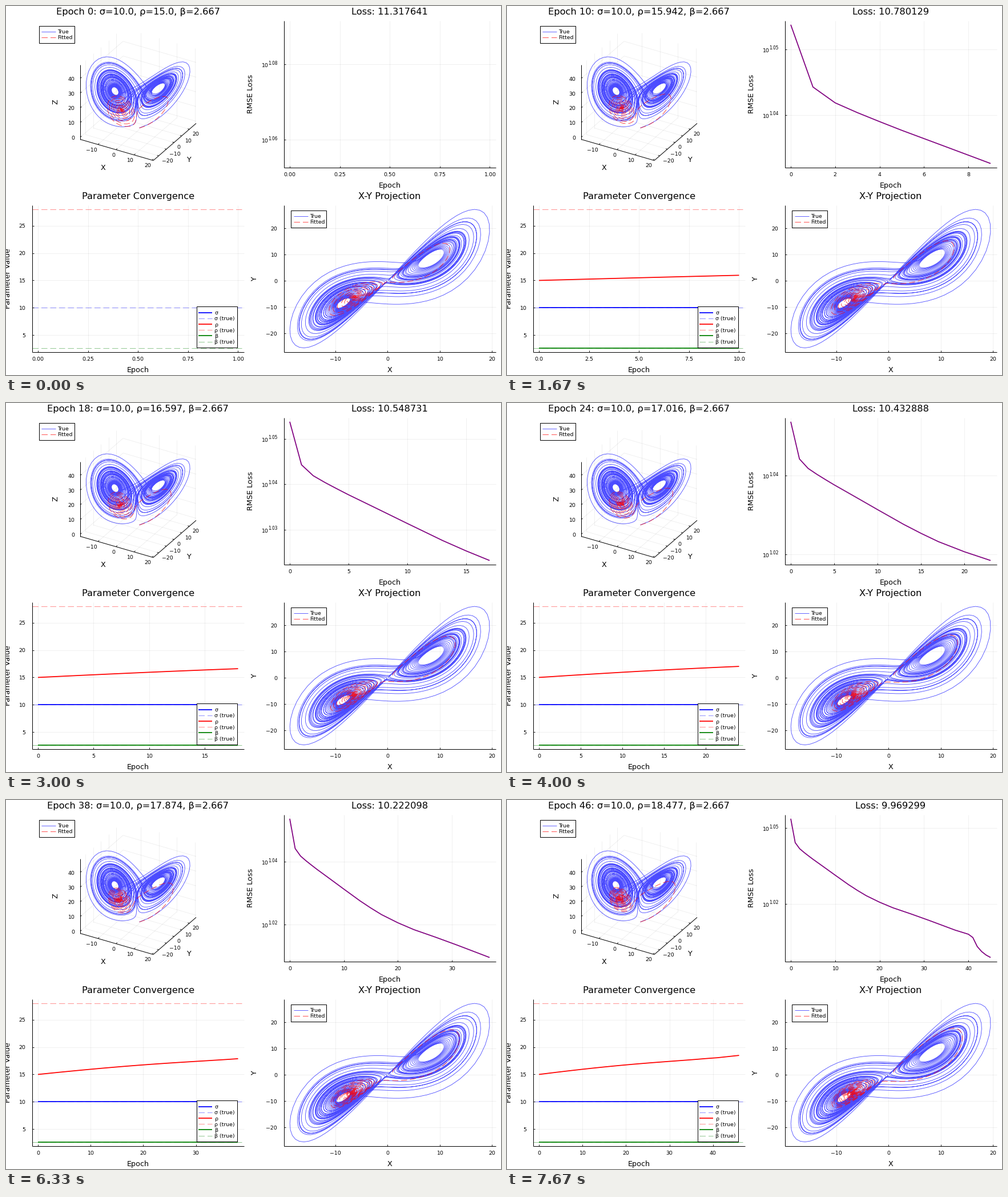
Write a matplotlib script that moves like this. It is 867 px wide and 646 px high and loops after 8 s.

```python
import math

import matplotlib.pyplot as plt
import numpy as np
from matplotlib.animation import FuncAnimation
from matplotlib.patches import Rectangle

W, H, DPI = 867, 646, 64
PT = 72 / DPI                      # points per pixel
FRAMES, LOOP_MS = 64, 8000
STAGES, EPOCH_STEP = 24, 2         # training snapshots per loop
SIGMA, RHO, BETA = 10.0, 28.0, 8 / 3
TITLE, GUIDE, TICK, SUPER = 16.3, 12.8, 9.35, 7.5
THIN, THICK = 0.85, 1.75
DASH = (10.5, 5)
TRUE_STYLE = dict(color="blue", alpha=0.7)
FIT_STYLE = dict(color="red", alpha=0.8, dashed=True)

plt.rcParams["font.family"] = "DejaVu Sans"
fig = plt.figure(figsize=(W / DPI, H / DPI), dpi=DPI, facecolor="white")
ax = fig.add_axes([0, 0, 1, 1])

# Training history: fitted rho per epoch and loss per step.
rho_knots = np.array([[0, 15], [6, 15.579], [14, 16.283], [24, 17.016],
                      [32, 17.501], [38, 17.874]])
rho_poly = np.polyfit(rho_knots[:, 0] / 38, rho_knots[:, 1], 5)
loss_knots = {
    0: 11.317641, 1: 11.073127, 2: 11.011842, 3: 10.974116, 4: 10.939624,
    5: 10.906192, 10: 10.748613, 13: 10.656113, 15: 10.600213, 17: 10.548731,
    20: 10.486142, 23: 10.432888, 27: 10.375384, 31: 10.315316, 37: 10.222098,
    40: 10.183627, 41: 10.153218, 42: 10.069341, 43: 10.023157, 44: 9.991283,
    45: 9.969299,
}
epochs = np.arange(47)
rhos = np.where(epochs <= 38, np.polyval(rho_poly, epochs / 38),
                np.interp(epochs, [38, 40, 41, 46],
                          [17.874, 17.995, 18.05, 18.477]))
losses = np.interp(np.arange(46), list(loss_knots), list(loss_knots.values()))


def lorenz_paths(rho, span=50, dt=0.005):
    """Integrate one trajectory per rho; result is (step, xyz, rho)."""
    def slope(u):
        x, y, z = u
        return np.array([SIGMA * (y - x), x * (rho - z) - y, x * y - BETA * z])

    u = np.ones((3, len(rho)))
    path = [u]
    for _ in range(int(span / dt)):
        a = slope(u)
        b = slope(u + dt / 2 * a)
        c = slope(u + dt / 2 * b)
        d = slope(u + dt * c)
        u = u + dt / 6 * (a + 2 * b + 2 * c + d)
        path.append(u)
    return np.array(path[::2])


paths = lorenz_paths(np.append(RHO, rhos[::EPOCH_STEP]))
true_path = paths[:, :, 0].T

XLIM, YLIM, ZLIM = (-19.84, 20.71), (-27.07, 28.83), (-1.43, 49.25)


def nice_ticks(lo, hi, fewest=4):
    """Pick the best scoring tick step; return tick values and decimals."""
    span, best = hi - lo, (-math.inf,)
    top = math.floor(math.log10(span))
    for power in range(top - 2, top + 2):
        for q, niceness in ((1, 1), (5, .9), (2, .7), (2.5, .5), (3, .2)):
            step = q * 10.0 ** power
            first = math.ceil(lo / step - 1e-9)
            last = math.floor(hi / step + 1e-9)
            n = last - first + 1
            if not fewest <= n <= 8:
                continue
            score = (.25 * (1 - abs(n - 5) / 5) + (first <= 0 <= last) / 6
                     + .5 * span / ((n - 1) * step) + .25 * niceness)
            best = max(best, (round(score, 6), -n, step, first, last))
    _, _, step, first, last = best
    decimals = next(d for d in range(9) if abs(round(step, d) - step) < 1e-9)
    return [i * step for i in range(first, last + 1)], decimals


def number(value, decimals):
    return f"{value:.{decimals}f}".replace("-", "−")


def padded(lo, hi):
    pad = 0.03 * (hi - lo)
    return lo - pad, hi + pad


def line(xs, ys, color="black", width=THIN, alpha=1, dashed=False, z=3,
         clip=None):
    style = (0, tuple(d / width for d in DASH)) if dashed else "-"
    artist, = ax.plot(xs, ys, color=color, lw=width * PT, alpha=alpha,
                      ls=style, zorder=z, dash_capstyle="butt",
                      solid_capstyle="butt")
    if clip is not None:
        artist.set_clip_path(clip)


def grid(xs, ys):
    line(xs, ys, alpha=0.07, z=1)


def text(x, y, s, size, ha="center"):
    """Place text with its digits centred on y."""
    ax.text(x, y + 0.365 * size, s, fontsize=size * PT, ha=ha, va="baseline",
            zorder=8)


def upright(x, y, s):
    ax.text(x + 1.2, y, s, fontsize=GUIDE * PT, rotation=90, ha="center",
            va="center", zorder=8)


def legend(box, rows, line_x, text_x, first_y):
    left, top, right, bottom = box
    ax.add_patch(Rectangle((left, top), right - left, bottom - top, fc="white",
                           ec="black", lw=PT, zorder=6))
    for i, (label, style) in enumerate(rows):
        y = first_y + 10.2 * i
        line(line_x, (y, y), z=7, **style)
        text(text_x, y + 0.3, label, TICK, "left")


class Panel:
    def __init__(self, box, xlim, ylim):
        self.box, self.xlim, self.ylim = box, xlim, ylim
        left, top, right, bottom = box
        self.clip = Rectangle((left, top), right - left, bottom - top,
                              transform=ax.transData)

    def px(self, x):
        (lo, hi), (left, _, right, _) = self.xlim, self.box
        return left + (np.asarray(x) - lo) / (hi - lo) * (right - left)

    def py(self, y):
        (lo, hi), (_, top, _, bottom) = self.ylim, self.box
        return bottom - (np.asarray(y) - lo) / (hi - lo) * (bottom - top)

    def axes(self, log=False):
        left, top, right, bottom = self.box
        values, decimals = nice_ticks(*self.xlim)
        for v in values:
            x = self.px(v)
            grid((x, x), (top, bottom))
            line((x, x), (bottom, bottom - 3.5), z=4)
            text(x, bottom + 12, number(v, decimals), TICK)
        values, decimals = nice_ticks(*self.ylim, 2 if log else 4)
        for v in values:
            y = self.py(v)
            grid((left, right), (y, y))
            line((left, left + 3.5), (y, y), z=4)
            edge = left - 11.5
            if log:
                text(edge + 0.3, y - 2.5, number(v, decimals), SUPER, "right")
                edge -= SUPER * (0.954 + 0.636 * decimals)
                text(edge + 0.3, y + 1.5, "10", TICK, "right")
            else:
                text(edge, y, number(v, decimals), TICK, "right")
        line((left, left), (top, bottom), width=1, z=4)
        line((left, right), (bottom, bottom), width=1, z=4)

    def curve(self, x, y, **style):
        line(self.px(x), self.py(y), clip=self.clip, **style)


def draw_space(fitted, shift):
    """Orthographic view of both attractors."""
    def project(x, y, z):
        u, v, w = x - XLIM[0], y - YLIM[0], z - ZLIM[0]
        return (130 + shift + 3.157 * u + 1.342 * v,
                233.5 + 0.912 * u - 1.163 * v - 2.575 * w)

    def segment(a, b, draw=grid, **style):
        p, q = project(*a), project(*b)
        draw((p[0], q[0]), (p[1], q[1]), **style)

    (x0, x1), (y0, y1), (z0, z1) = XLIM, YLIM, ZLIM
    for x in nice_ticks(*XLIM)[0]:
        segment((x, y0, z0), (x, y1, z0))
        segment((x, y1, z0), (x, y1, z1))
        px, py = project(x, y0, z0)
        line((px, px + 2.3), (py, py - 2), z=4)
        text(px - 1.5, py + 9, number(x, 0), TICK, "right")
    for y in nice_ticks(*YLIM)[0]:
        segment((x0, y, z0), (x1, y, z0))
        segment((x0, y, z0), (x0, y, z1))
        px, py = project(x1, y, z0)
        line((px, px - 2.8), (py, py - 0.8), z=4)
        text(px + 5, py + 8, number(y, 0), TICK, "left")
    for z in nice_ticks(*ZLIM)[0]:
        segment((x0, y0, z), (x0, y1, z))
        segment((x0, y1, z), (x1, y1, z))
        px, py = project(x0, y0, z)
        line((px, px + 2.3), (py, py - 2), z=4)
        text(px - 10, py + 0.7, number(z, 0), TICK, "right")
    for a, b in (((x0, y0, z0), (x0, y0, z1)), ((x0, y0, z0), (x1, y0, z0)),
                 ((x1, y0, z0), (x1, y1, z0))):
        segment(a, b, line, width=1, z=4)

    line(*project(*true_path), **TRUE_STYLE)
    line(*project(*fitted), **FIT_STYLE)
    text(170 + shift, 282, "X", GUIDE)
    text(319.5 + shift, 268, "Y", GUIDE)
    upright(85.5 + shift, 168, "Z")
    legend((57.5, 34.5, 119.5, 64.5),
           [("True", TRUE_STYLE), ("Fitted", FIT_STYLE)],
           (61.5, 87), 90.3, 44.5)


def draw(frame):
    ax.clear()
    ax.set(xlim=(0, W), ylim=(H, 0))
    ax.axis("off")
    stage = ((frame + 1) * STAGES - 1) // FRAMES
    epoch = EPOCH_STEP * stage
    history = losses[:max(epoch, 1)]
    fitted = paths[:, :, stage + 1].T

    # A single loss value gets a unit-wide range above it.
    low, high = history[-1], history[0] + (epoch == 0)
    loss_ylim = padded(math.log10(low), math.log10(high))
    wide = 2.5 * (nice_ticks(*loss_ylim, 2)[1] > 2)
    shift = -wide / 2
    left_mid, right_mid = 231.2 + shift, 672 - shift
    right_x = 486.5 + wide

    text(left_mid, 9, f"Epoch {epoch}: σ=10.0, ρ={round(float(rhos[epoch]), 3)}, "
         "β=2.667", TITLE)
    draw_space(fitted, shift)

    panel = Panel((right_x, 25.5, 857.5, 283),
                  padded(0, max(epoch - 1, 1)), loss_ylim)
    panel.axes(log=True)
    if epoch:
        panel.curve(np.arange(epoch), np.log10(history), color="purple",
                    width=THICK)
    text(right_mid, 9, f"Loss: {round(float(history[-1]), 6)}", TITLE)
    text(right_mid, 313, "Epoch", GUIDE)
    upright(427 - wide * 0.8, 154, "RMSE Loss")

    panel = Panel((45.5, 348.5, 417 - wide, 606), padded(0, max(epoch, 1)),
                  padded(BETA, RHO))
    panel.axes()
    seen = epochs[:epoch + 1]
    rows = []
    for name, color, fit, true in (("σ", "blue", np.full(47, SIGMA), SIGMA),
                                   ("ρ", "red", rhos, RHO),
                                   ("β", "green", np.full(47, BETA), BETA)):
        solid = dict(color=color, width=THICK)
        dashes = dict(color=color, alpha=0.5, dashed=True)
        if epoch:
            panel.curve(seen, fit[seen], **solid)
        panel.curve(panel.xlim, (true, true), **dashes)
        rows += [(name, solid), (f"{name} (true)", dashes)]
    legend((333.5 - wide, 526, 404.5 - wide, 597.5), rows,
           (337 - wide, 361 - wide), 365.3 - wide, 536.5)
    text(left_mid, 332, "Parameter Convergence", TITLE)
    text(left_mid, 636, "Epoch", GUIDE)
    upright(2.6, 477, "Parameter Value")

    panel = Panel((right_x, 348.5, 857.5, 606), XLIM, YLIM)
    panel.axes()
    panel.curve(*true_path[:2], **TRUE_STYLE)
    panel.curve(*fitted[:2], **FIT_STYLE)
    legend((499 + wide, 357.5, 560.5 + wide, 388),
           [("True", TRUE_STYLE), ("Fitted", FIT_STYLE)],
           (504 + wide, 528.5 + wide), 531.7 + wide, 367.5)
    text(right_mid, 332, "X-Y Projection", TITLE)
    text(right_mid, 636, "X", GUIDE)
    upright(434.5 + wide, 478, "Y")
    return []


anim = FuncAnimation(fig, draw, frames=FRAMES, interval=LOOP_MS / FRAMES,
                     init_func=lambda: [], repeat=True, repeat_delay=0)
plt.show()
```
